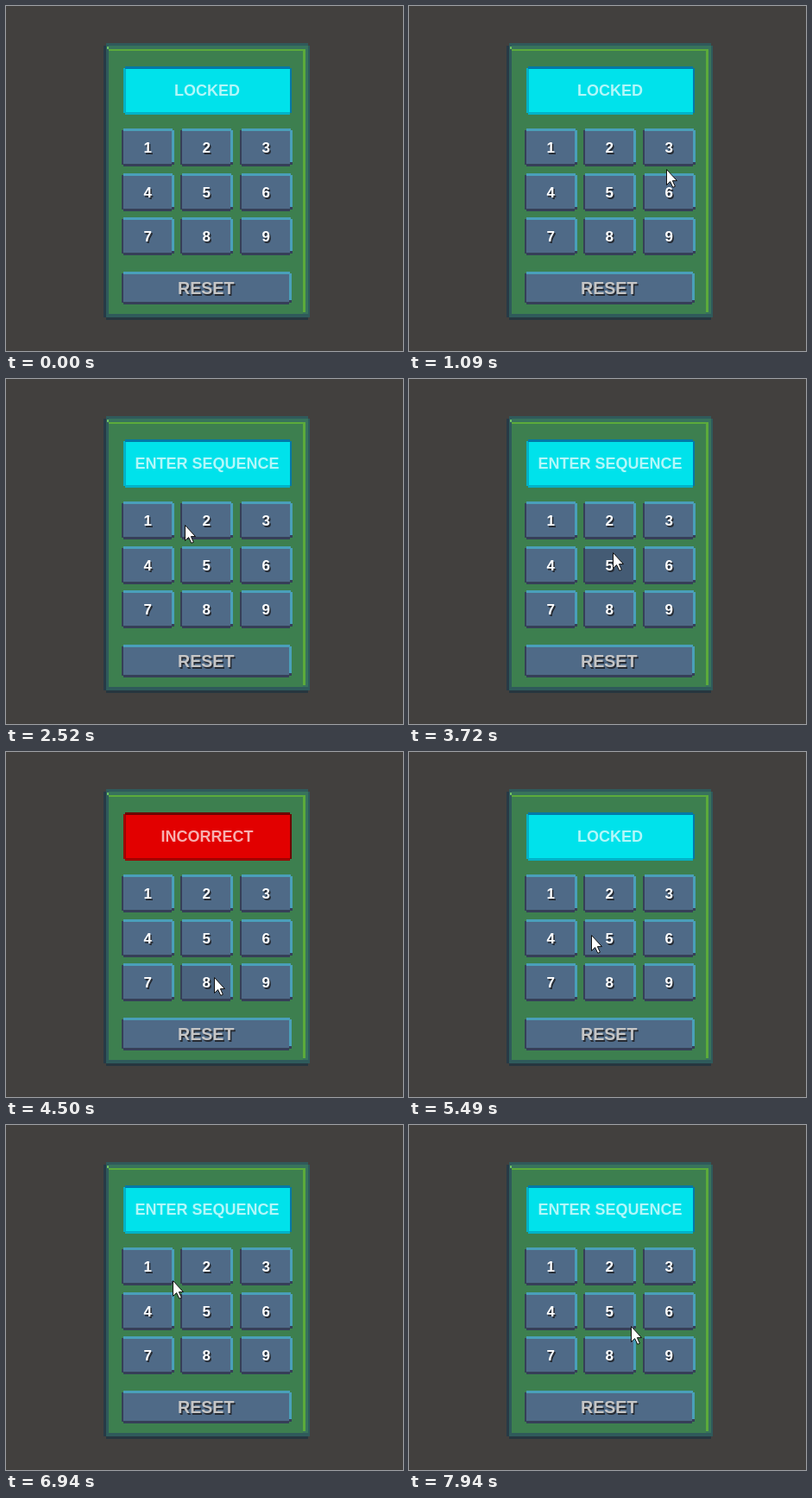
Recreate the animation shown at these times as an HTML page. Size 460x400 px, loop 8 s.

```html
<!DOCTYPE html>
<html lang="en">
<head>
<meta charset="utf-8">
<title>Keypad</title>
<style>
html, body { margin: 0; width: 100%; height: 100%; overflow: hidden; background: #42403e; }
svg { display: block; width: 460px; height: 400px; }
text { font-family: "Liberation Sans", Arial, sans-serif; font-weight: bold; text-anchor: middle; }
</style>
</head>
<body>
<svg id="stage" viewBox="0 0 460 400" shape-rendering="crispEdges"></svg>
<script>
const LOOP = 8000, FRAME = 111;
const stage = document.getElementById('stage');

function add(tag, attrs, content) {
  const node = document.createElementNS('http://www.w3.org/2000/svg', tag);
  for (const key in attrs) node.setAttribute(key, attrs[key]);
  if (content) node.textContent = content;
  stage.appendChild(node);
  return node;
}

const rect = (x, y, width, height, fill) => add('rect', { x, y, width, height, fill });
const label = (x, y, size, fill, content) => add('text', { x, y, 'font-size': size, fill }, content);
const fill = (node, color) => node.setAttribute('fill', color);

function shadowed(x, y, size, color, content) {
  label(x + 1.5, y + 1.5, size, '#262b33', content);
  label(x, y, size, color, content);
}

// Bevelled box with notched corners; returns its face
function button(x, y, w, h) {
  const light = '#4a9fba', dark = '#363f58';
  const face = rect(x + 2, y + 2, w - 4, h - 4, '#4f6a87');
  rect(x, y + 2, 2, h - 4, dark);
  rect(x + 2, y + h - 3, w - 5, 3, dark);
  rect(x + 2, y, w - 4, 3, light);
  rect(x + w - 3, y + 2, 3, h - 7, light);
  rect(x + w - 3, y + h - 5, 3, 3, dark);
  return face;
}

// Panel
rect(113, 46, 3, 315, '#273a46');
rect(116, 43, 234, 3, '#2f5a5b');
rect(116, 46, 236, 315, '#2f5a5b');
rect(116, 361, 234, 3, '#26363f');
rect(119, 46, 231, 311, '#38735c');
rect(119, 50, 225, 307, '#3d7f4f');
rect(119, 50, 228, 2, '#5cab3b');
rect(117, 47, 2, 3, '#6fbf62');
rect(344, 52, 3, 303, '#5cab3b');

// Display
const rim = [rect(136, 72, 3, 52), rect(138, 123, 191, 3)];
const shade = [rect(138, 70, 191, 3), rect(329, 72, 2, 52)];
const glass = rect(139, 73, 190, 50);
const message = label(233, 104.3, 18);

// Keys
const keys = [];
for (let i = 0; i < 9; i++) {
  const x = Math.round(134 + 68.4 * (i % 3));
  const y = Math.round(142 + 51.6 * Math.floor(i / 3));
  keys.push(button(x, y, 61, 44));
  shadowed(x + 30.3, y + 28, 17, '#fff', String(i + 1));
}
button(134, 308, 197, 38);
shadowed(231.7, 334, 19.6, '#c6c6c6', 'RESET');

const cursor = add('path', {
  d: 'M.5 .5V18.5L4.6 14.6L7.8 21.3L10.4 20.2L7.4 13.6H12.5Z',
  fill: '#fff', stroke: '#111', 'shape-rendering': 'auto'
});

// Curved sweeps: start and end time, bend, resting point
const entry = [410, 415];
const sweeps = [
  [530, 1310, [310, 200], [277, 157]],
  [1410, 1870, [225, 149], [186, 164]],
  [2290, 2520, [190, 165], [207, 169]],
  [3280, 3610, [214, 178], [236, 201]],
  [4060, 4180, [238, 222], [241, 261]],
  [5050, 5830, [235, 221], [171, 184]],
  [5930, 6170, [166, 172], [164, 164]],
  [6710, 7270, [191, 176], [226, 204]],
  [7720, 7940, [238, 214], [257, 233]]
];
const screens = [
  [0, 'LOCKED'], [2180, 'ENTER SEQUENCE'], [4500, 'INCORRECT'],
  [5490, 'LOCKED'], [6710, 'ENTER SEQUENCE']
];
// Key, start and end time, depth of the tint
const presses = [
  [5, 3720, 4500, 1], [8, 4400, 5270, .4], [1, 6600, 6710, 1], [5, 7380, 7500, 1]
];

function cursorAt(t) {
  const i = sweeps.filter(s => s[0] <= t).length - 1;
  if (i < 0) return null;
  const [from, to, bend, end] = sweeps[i];
  const begin = i ? sweeps[i - 1][3] : entry;
  const gaps = Math.round((to - from) / FRAME);
  const step = Math.min(gaps, Math.floor((t - from) / (to - from) * gaps + .1));
  const u = (step + 1) / (gaps + 1), v = 1 - u;
  return begin.map((a, k) => Math.round(v * v * a + 2 * u * v * bend[k] + u * u * end[k]));
}

function draw(t) {
  const pos = cursorAt(t);
  cursor.setAttribute('visibility', pos ? 'visible' : 'hidden');
  if (pos) cursor.setAttribute('transform', `translate(${pos})`);

  const content = screens.filter(s => s[0] <= t).pop()[1];
  const wrong = content === 'INCORRECT';
  message.textContent = content;
  fill(message, wrong ? '#f7b0b0' : '#b2f7f9');
  fill(glass, wrong ? '#e20000' : '#00e2eb');
  rim.forEach(r => fill(r, wrong ? '#a00000' : '#00b2c8'));
  shade.forEach(r => fill(r, wrong ? '#6e0000' : '#0079a8'));

  keys.forEach((key, i) => {
    const press = presses.find(([n, from, to]) => n === i + 1 && t >= from && t < to);
    const tint = 1 - .14 * (press ? press[3] : 0);
    fill(key, `rgb(${[79, 106, 135].map(c => Math.round(c * tint))})`);
  });
}

const start = performance.now();
function tick() {
  draw((performance.now() - start) % LOOP);
  requestAnimationFrame(tick);
}
tick();
</script>
</body>
</html>
```
